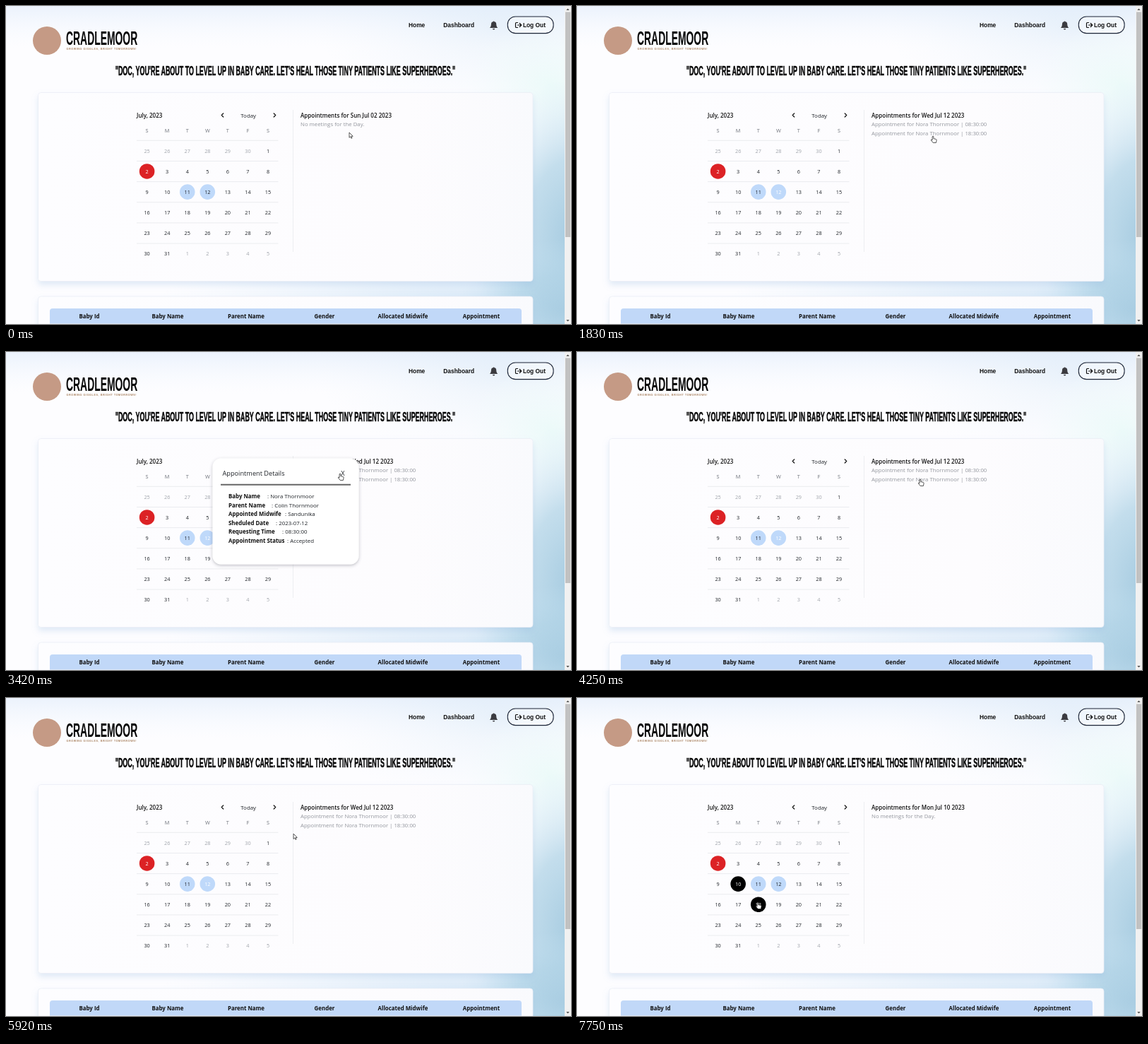
Animation, 800 px wide and 450 px high, one loop 8000 ms. Source, as an HTML page:

```html
<!DOCTYPE html>
<html lang="en">
<head>
<meta charset="utf-8">
<title>Appointments dashboard</title>
<style>
  html, body { margin: 0; width: 100%; height: 100%; overflow: hidden; background: #fdfdff; }
  svg { display: block; width: 100vw; height: 100vh; }
  text { font: 400 7.9px "Open Sans", "Noto Sans", sans-serif; fill: #1f2328; white-space: pre; }
  .semi { font-weight: 600; font-size: 8.05px; fill: #111; }
  .bold { font-weight: 700; fill: #111; }
  .nav { font: 700 8.4px "Liberation Sans", Arial, sans-serif; fill: #111; }
  .display { font: 700 17.65px "Liberation Sans", Arial, sans-serif; fill: #050505; }
  .brand { font-size: 27.5px; }
  .tagline { font: 700 3.7px "Liberation Sans", Arial, sans-serif; fill: #a98260; letter-spacing: .58px; }
  .title { font-size: 9.2px; }
  .day { font-size: 7.3px; text-anchor: middle; }
  .mid { text-anchor: middle; }
  .muted { fill: #92959c; }
  .soft { fill: #6f737b; }
  .rows { font-size: 7.8px; }
  .line { fill: none; stroke: #111; stroke-width: 1.2; stroke-linecap: round; stroke-linejoin: round; }
  .pointer { fill: #fff; stroke: #222; stroke-width: .75; stroke-linejoin: round; }
</style>
</head>
<body>
<svg viewBox="0 0 800 450" preserveAspectRatio="none">
  <defs>
    <radialGradient id="sky"><stop stop-color="#a3c9df"/><stop offset=".5" stop-color="#b0d3e6" stop-opacity=".75"/><stop offset="1" stop-color="#c8e4f3" stop-opacity="0"/></radialGradient>
    <radialGradient id="haze"><stop stop-color="#c6def2"/><stop offset="1" stop-color="#dbeafa" stop-opacity="0"/></radialGradient>
    <radialGradient id="mint"><stop stop-color="#ecfaf9"/><stop offset="1" stop-color="#f0fbfb" stop-opacity="0"/></radialGradient>
    <linearGradient id="top" x2="0" y2="1"><stop stop-color="#ebf2fc"/><stop offset="1" stop-color="#f7faff" stop-opacity="0"/></linearGradient>
    <linearGradient id="card"><stop stop-color="#fdfdff"/><stop offset=".75" stop-color="#fdfcfe"/><stop offset="1" stop-color="#f9fafd"/></linearGradient>
    <filter id="cardShadow" x="-10%" y="-10%" width="120%" height="125%"><feDropShadow dx="0" dy="5" stdDeviation="4" flood-color="#8fb3de" flood-opacity=".26"/></filter>
    <filter id="modalShadow" x="-10%" y="-10%" width="120%" height="125%"><feDropShadow dx="0" dy="1.5" stdDeviation="2" flood-color="#445" flood-opacity=".35"/></filter>
  </defs>

  <rect width="800" height="450" fill="#fdfdff"/>
  <rect width="800" height="60" fill="url(#top)"/>
  <ellipse cx="700" cy="30" rx="260" ry="120" fill="url(#haze)" opacity=".3"/>
  <ellipse cx="770" cy="110" rx="120" ry="90" fill="url(#mint)"/>
  <ellipse cx="690" cy="430" rx="480" ry="110" fill="url(#haze)" opacity=".8"/>
  <ellipse cx="810" cy="330" rx="150" ry="230" fill="url(#sky)"/>
  <ellipse cx="790" cy="430" rx="150" ry="100" fill="url(#sky)" opacity=".7"/>

  <circle cx="58" cy="49" r="20" fill="#c59a85"/>
  <text class="display brand" transform="translate(85 55) scale(.506 1)">CRADLEMOOR</text>
  <text class="tagline" x="85.5" y="62.3">GROWING GIGGLES, BRIGHT TOMORROWS!</text>

  <text class="nav" x="570" y="30">Home</text>
  <text class="nav" x="619.3" y="30">Dashboard</text>
  <path d="M685 31c2-2 1.8-4 2-5.5a3.6 3.6 0 0 1 7.2 0c.2 1.5 0 3.5 2 5.5z M689 32h3.2a1.6 1.6 0 0 1-3.2 0z M690 21.5h1.2v2H690z" fill="#3b3b40"/>
  <rect x="710.3" y="15" width="64.8" height="23.6" rx="11" fill="#fff" fill-opacity=".35" stroke="#1c2436" stroke-width="1.1"/>
  <path class="line" d="M724.5 23.5h-2q-1 0-1 1v5q0 1 1 1h2M724.5 27h5M727.3 24.5l2.5 2.5-2.5 2.5"/>
  <text class="nav" x="731.9" y="30">Log Out</text>

  <text class="display" stroke="#050505" stroke-width=".5" transform="translate(395.5 98) scale(.506 1)" text-anchor="middle">"DOC, YOU'RE ABOUT TO LEVEL UP IN BABY CARE. LET'S HEAL THOSE TINY PATIENTS LIKE SUPERHEROES."</text>

  <g fill="url(#card)" stroke="#e9edf5" stroke-width=".7" filter="url(#cardShadow)">
    <rect x="45.5" y="122.5" width="700.5" height="267" rx="4"/>
    <rect x="45.5" y="411" width="700.5" height="80" rx="4"/>
  </g>
  <path d="M62 450v-18q0-4 4-4h660q4 0 4 4v18z" fill="#c1d8f8"/>
  <path d="M62 449.5h668" stroke="#dfe9f8"/>
  <g id="columns"></g>

  <text class="semi" x="185" y="157.5">July, 2023</text>
  <text class="mid" x="343.2" y="157.5">Today</text>
  <path class="line" d="M307.7 152l-2.5 2.5 2.5 2.5M379.2 152l2.5 2.5-2.5 2.5"/>
  <path d="M406.5 147v201" stroke="#e9eaee" stroke-width=".8"/>
  <g id="calendar"></g>

  <text id="heading" class="semi" x="417" y="157.5"></text>
  <text id="first" class="muted rows" x="417" y="170"></text>
  <text id="second" class="muted rows" x="417" y="182.5"></text>

  <g id="modal">
    <rect x="292.5" y="150.5" width="207" height="150" rx="12" fill="#fff" filter="url(#modalShadow)"/>
    <text class="title" x="306.5" y="175">Appointment Details</text>
    <text class="title mid" x="477" y="175.2">X</text>
    <path d="M304 187.7h184" stroke="#666" stroke-width="2"/>
    <g id="details"></g>
  </g>

  <path d="M791 0h9v450h-9z" fill="#f1f1f1"/>
  <path d="M792 8.5h7.2v318.5H792z" fill="#c1c1c1"/>
  <path d="M793.3 6l2.2-2.5 2.2 2.5z M793.3 444l2.2 2.5 2.2-2.5z" fill="#555"/>

  <path id="arrow" class="pointer" d="M0 0v7.3l1.7-1.5 1.2 2.5 1.2-.6-1.2-2.4h2.3z"/>
  <path id="hand" class="pointer" d="M-.9.7q.9-1.3 1.8 0v3l3.3.7q1 .4.9 1.5l-.7 3.6h-4.2l-2.8-3.5q-.2-1.2.8-.9l.9.8z"/>
</svg>
<script>
const LOOP = 8000, STEP = 1000 / 12;
const BABY = "Nora Thornmoor", TIMES = ["08:30:00", "18:30:00"];
const BUSY = [11, 12], TODAY = 2, RADIUS = 10.8;

// Pointer tip: time, x, y
const path = [
  [0, 486, 179], [420, 420, 215], [830, 290, 262], [1250, 286, 264],
  [1670, 490, 188], [1830, 504, 184], [2170, 492, 169], [2580, 484, 167],
  [3000, 478, 170], [3420, 473, 172], [3580, 473, 172], [4000, 484, 179],
  [4250, 486, 180], [4500, 486, 179], [4920, 476, 171], [5250, 479, 169],
  [5670, 470, 172], [6330, 270, 236], [6500, 216, 247], [6670, 216, 247],
  [6750, 222, 249], [7000, 228, 262], [7330, 228, 262], [7750, 256, 289]
];
const selections = [[0, 2, "Sun Jul 02 2023"], [1040, 12, "Wed Jul 12 2023"], [7320, 10, "Mon Jul 10 2023"]];
// Opened, closed, index of the time slot
const modals = [[2620, 3490, 0], [4380, 5130, 1]];

const byId = id => document.getElementById(id);
function add(parent, tag, attrs, content = "") {
  const node = document.createElementNS("http://www.w3.org/2000/svg", tag);
  for (const key in attrs) node.setAttribute(key, attrs[key]);
  node.textContent = content;
  return parent.appendChild(node);
}

["Baby Id", "Baby Name", "Parent Name", "Gender", "Allocated Midwife", "Appointment"]
  .forEach((label, i) => add(byId("columns"), "text", { x: 118 + i * 111, y: 441.5, class: "bold mid" }, label));

const calendar = byId("calendar"), columnX = i => 199.6 + i * 28.57, rowY = i => 205 + i * 29.15;
[..."SMTWTFS"].forEach((letter, i) =>
  add(calendar, "text", { x: columnX(i), y: 178.5, class: "day soft" }, letter));
const cells = [];
for (let i = 0; i < 42; i++) {
  const column = i % 7, row = Math.floor(i / 7), x = columnX(column), y = rowY(row);
  if (!column) add(calendar, "path", { d: `M185 ${y - 14.7}h200.5`, stroke: "#e6e7eb", "stroke-width": .8 });
  const day = i - 5, inMonth = day > 0 && day < 32;
  const number = inMonth ? day : day < 1 ? day + 30 : day - 31;
  const disc = add(calendar, "circle", { cx: x, cy: y - .2, r: RADIUS });
  const label = add(calendar, "text", { x, y: y + 2.6, class: "day" }, number);
  cells.push({ day: inMonth ? day : 0, x, y, disc, label });
}

const details = [
  ["Baby Name", 370, BABY], ["Parent Name", 376, "Colin Thornmoor"],
  ["Appointed Midwife", 395, "Sandunika"], ["Sheduled Date", 382, "2023-07-12"],
  ["Requesting Time", 391, TIMES[0]], ["Appointment Status", 398, "Accepted"]
].map(([label, x, value], i) => {
  const y = 207 + i * 12.5;
  add(byId("details"), "text", { x: 315, y, class: "bold" }, label);
  return add(byId("details"), "text", { x, y }, ": " + value);
});

function pointerAt(time) {
  const next = path.findIndex(point => point[0] > time);
  if (next < 0) return path[path.length - 1].slice(1);
  const [t0, x0, y0] = path[next - 1], [t1, x1, y1] = path[next];
  const p = (time - t0) / (t1 - t0), ease = p * p * (3 - 2 * p);
  return [x0 + (x1 - x0) * ease, y0 + (y1 - y0) * ease];
}

const inside = (x, y, left, top, right, bottom) => x >= left && x <= right && y >= top && y <= bottom;

function render(time) {
  const [x, y] = pointerAt(time);
  const [, selected, date] = selections.filter(s => s[0] <= time).pop();
  const modal = modals.find(m => time >= m[0] && time < m[1]);
  const booked = selected === 12;
  let clickable = modal ? inside(x, y, 470, 165, 484, 180) : booked && inside(x, y, 417, 162, 580, 187);

  for (const cell of cells) {
    const { day } = cell;
    const hover = !modal && Math.hypot(x - cell.x, y - cell.y) < RADIUS;
    if (hover) clickable = true;
    const active = day === TODAY || day && day === selected || hover;
    const fill = day === TODAY ? "#dc2225"
      : BUSY.includes(day) && (!hover || day === selected) ? "#bfd9fa"
      : active ? "#000" : "none";
    cell.disc.setAttribute("fill", fill);
    cell.label.style.fill = active ? "#fff" : day ? "#1f2328" : "#a0a4ab";
  }

  byId("heading").textContent = "Appointments for " + date;
  const rows = TIMES.map(slot => `Appointment for ${BABY} | ${slot}`);
  byId("first").textContent = booked ? rows[0] : "No meetings for the Day.";
  byId("second").textContent = booked ? rows[1] : "";

  byId("modal").style.display = modal ? "" : "none";
  if (modal) details[4].textContent = ": " + TIMES[modal[2]];

  for (const id of ["arrow", "hand"]) {
    byId(id).setAttribute("transform", `translate(${x} ${y})`);
    byId(id).style.display = (id === "hand") === Boolean(clickable) ? "" : "none";
  }
}

const start = performance.now();
function tick() {
  const time = (performance.now() - start) % LOOP;
  render(Math.floor((time + 4) / STEP) * STEP % LOOP);
  requestAnimationFrame(tick);
}
tick();
</script>
</body>
</html>
```
